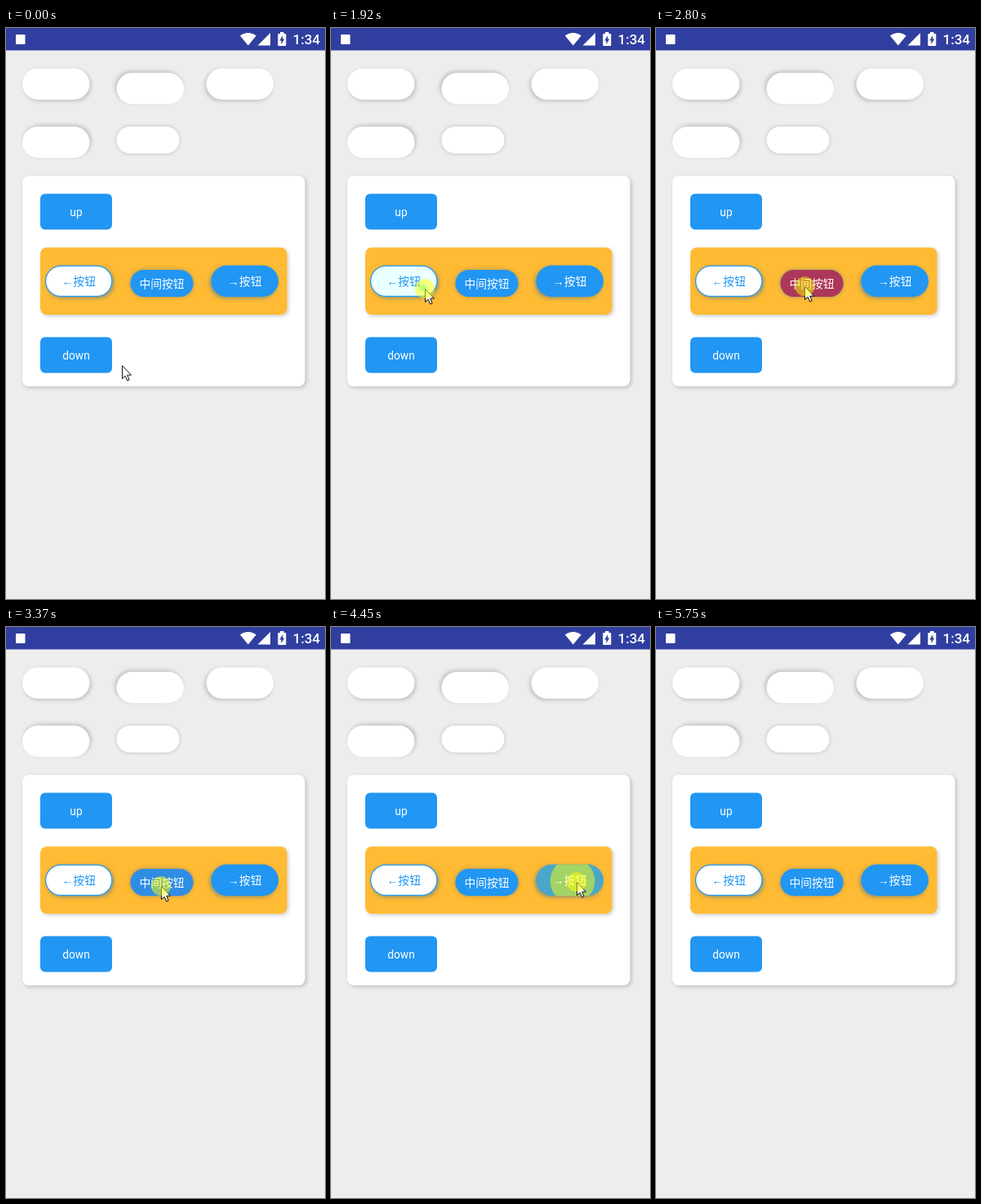
An HTML page with a canvas that plays this animation: 391x701 px, repeating every 6.18 s.

```html
<!DOCTYPE html>
<html lang="zh">
<head>
<meta charset="utf-8">
<title>Shadow buttons</title>
<style>
  html, body { margin: 0; width: 100%; height: 100%; overflow: hidden; background: #ededed; }
  canvas { display: block; }
</style>
</head>
<body>
<canvas id="stage" width="391" height="701"></canvas>
<script>
const ctx = document.getElementById('stage').getContext('2d');
const LOOP = 6180, REFRESH = 50;
const BLUE = '#2196f3', BAR = '#303f9f', PAGE = '#ededed';
const LABEL_FONT = '13.75px Roboto, "Liberation Sans", "Noto Sans CJK SC", "Noto Sans CJK", sans-serif';

// A slot loses INSET on every side where its shadow shows.
const SLOT_W = 88, SLOT_H = 44, INSET = 5.5;

const RIGHT_BOTTOM = [1, 1], LEFT_TOP = [-1, -1], LEFT_BOTTOM = [-1, 1],
  RIGHT_TOP = [1, -1], AROUND = [0, 0];
const PILL_SHADOWS = [RIGHT_BOTTOM, LEFT_TOP, LEFT_BOTTOM, RIGHT_TOP, AROUND];
const BUTTONS = [
  { label: '←按钮', shadow: RIGHT_BOTTOM, fill: '#fff', ink: BLUE, ripple: '#00ffff' },
  { label: '中间按钮', shadow: AROUND, fill: BLUE, ink: '#fff', ripple: '#ff0000' },
  { label: '→按钮', shadow: LEFT_BOTTOM, fill: BLUE, ink: '#fff', ripple: '#ffff00' }
];

// The pointer glides to each stop just before its time.
const stop = (time, x, y) => ({ time, x, y });
const START = stop(0, 142, 414), APPROACH = stop(280, 101, 342), EXIT = stop(5740, 348, 412);
const PRESSES = [
  stop(635, 116, 320), stop(1600, 115, 320),
  stop(2290, 181, 317), stop(3075, 190, 318),
  stop(4043, 301, 313), stop(4665, 301, 313)
];
const STOPS = [START, APPROACH, ...PRESSES, EXIT];
const GLIDE = 360;

// Every button gets a long and a short click; the app reacts after LAG.
const LAG = 200;
const CLICKS = PRESSES.map(({ time, x, y }, i) =>
  ({ down: time, up: time + (i % 2 ? 320 : 520), x, y, target: i >> 1 }));

const clamp = v => Math.max(0, Math.min(1, v));
const mix = (a, b, p) => a + (b - a) * p;

function pointerAt(t) {
  const next = STOPS.findIndex(({ time }) => time > t);
  const a = STOPS[next - 1], b = STOPS[next];
  const begin = Math.max(a.time, b.time - GLIDE);
  const p = clamp((t - begin) / (b.time - begin)), eased = p * p * (3 - 2 * p);
  return [mix(a.x, b.x, eased), mix(a.y, b.y, eased)];
}

function slotBox(x, y, [dx, dy]) {
  const left = dx <= 0 ? INSET : 0, right = dx >= 0 ? INSET : 0;
  const top = dy <= 0 ? INSET : 0, bottom = dy >= 0 ? INSET : 0;
  return [x + left, y + top, SLOT_W - left - right, SLOT_H - top - bottom];
}

function roundBox(x, y, w, h, radius, fill) {
  ctx.beginPath();
  ctx.roundRect(x, y, w, h, radius);
  ctx.fillStyle = fill;
  ctx.fill();
}

function shadowBox([x, y, w, h], radius, fill, [dx, dy], color = 'rgba(0,0,0,0.2)') {
  ctx.save();
  ctx.shadowColor = color;
  ctx.shadowBlur = 5;
  ctx.shadowOffsetX = dx * 1.8;
  ctx.shadowOffsetY = dy * 1.8;
  roundBox(x, y, w, h, radius, fill);
  ctx.restore();
}

function disc(x, y, radius, fill, alpha) {
  ctx.globalAlpha = alpha;
  ctx.fillStyle = fill;
  ctx.beginPath();
  ctx.arc(x, y, radius, 0, 2 * Math.PI);
  ctx.fill();
  ctx.globalAlpha = 1;
}

function text(string, x, y, color, font = LABEL_FONT, align = 'center') {
  ctx.font = font;
  ctx.textAlign = align;
  ctx.fillStyle = color;
  ctx.fillText(string, x, y);
}

function drawStatusBar() {
  ctx.fillStyle = BAR;
  ctx.fillRect(0, 0, 391, 27.5);
  roundBox(12, 8, 11.5, 12, 1, '#fff');

  // Wi-Fi fan and signal triangle
  ctx.beginPath();
  ctx.moveTo(296.8, 21.5);
  ctx.arc(296.8, 21.5, 15.5, -Math.PI * 0.72, -Math.PI * 0.28);
  ctx.fill();
  ctx.fill(new Path2D('M324 6V21.5H308.5Z'));

  // Battery with a point-symmetric bolt
  roundBox(333.3, 7, 10, 15, 1, '#fff');
  ctx.fillRect(336, 5, 4.5, 3);
  ctx.fillStyle = BAR;
  for (const turn of [0, Math.PI]) {
    ctx.save();
    ctx.translate(338.3, 14.5);
    ctx.rotate(turn);
    ctx.fill(new Path2D('M0.9 -5.5L-3 1H0.9Z'));
    ctx.restore();
  }
  text('1:34', 385, 20, '#fff', '500 17px Roboto, sans-serif', 'right');
}

function drawRipple([x, y, w, h], color, index, t) {
  const click = CLICKS.findLast(({ target, down }) => target === index && down + LAG <= t);
  if (!click) return;
  const press = click.down + LAG, release = click.up + LAG;
  const cx = x + w / 2, cy = y + h / 2;

  // The tint rises slowly, completes quickly on release, then fades.
  let tint = clamp((Math.min(t, release) - press) / 600);
  if (t > release) {
    const rush = (1 - tint) * 120, since = t - release;
    tint = since < rush ? mix(tint, 1, since / rush) : clamp(1 - (since - rush) / 480);
  }
  const grow = clamp((t - press - 80) / 211);
  const fade = 1 - clamp((t - release) / 400);

  ctx.save();
  ctx.beginPath();
  ctx.roundRect(x, y, w, h, h / 2);
  ctx.clip();
  disc(cx, cy, w, color, tint / 2);
  disc(mix(click.x, cx, grow), mix(click.y, cy, grow), grow * Math.hypot(w, h) / 2, color, fade / 2);
  ctx.restore();
}

function drawButton({ label, shadow, fill, ink, ripple }, index, t) {
  const box = slotBox(48 + 99 * index, 291.5, shadow);
  const [x, y, w, h] = box;
  shadowBox(box, h / 2, BLUE, shadow, 'rgba(95,130,140,0.7)');
  roundBox(x + 1.2, y + 1.2, w - 2.4, h - 2.4, h / 2 - 1.2, fill);
  drawRipple(box, ripple, index, t);
  text(label, x + w / 2, Math.round(y + h / 2 + 5.6), ink);
}

function drawPointer(t) {
  if (t >= EXIT.time) return;
  const [x, y] = pointerAt(t);
  const arrow = new Path2D('M0 0V16L3.6 12.6L6.2 18.5L8.6 17.5L6.2 11.6H11Z');
  ctx.save();
  ctx.translate(Math.round(x) + 0.5, Math.round(y) + 0.5);
  ctx.fillStyle = '#fff';
  ctx.fill(arrow);
  ctx.strokeStyle = '#111';
  ctx.stroke(arrow);
  ctx.restore();
  if (CLICKS.some(({ down, up }) => down <= t && t < up)) disc(x, y, 12, '#ffff00', 0.5);
}

function drawBlueBox(label, y) {
  roundBox(42, y, SLOT_W, SLOT_H, 6, BLUE);
  text(label, 42 + SLOT_W / 2, Math.round(y + 27), '#fff');
}

function draw(t) {
  ctx.fillStyle = PAGE;
  ctx.fillRect(0, 0, 391, 701);
  drawStatusBar();
  PILL_SHADOWS.forEach((shadow, i) => {
    const box = slotBox(20 + 110 * (i % 3), 49.5 + 66 * Math.floor(i / 3), shadow);
    shadowBox(box, box[3] / 2, '#fff', shadow);
  });
  shadowBox([20, 181.5, 346.5, 258.5], 8, '#fff', RIGHT_BOTTOM);
  drawBlueBox('up', 203.5);
  shadowBox([42, 269.5, 302.5, 82.5], 8, '#ffbb33', RIGHT_BOTTOM);
  BUTTONS.forEach((button, index) => drawButton(button, index, t));
  drawBlueBox('down', 379.5);
  drawPointer(t);
}

function tick() {
  const t = performance.now() % LOOP;
  draw(Math.floor(t / REFRESH) * REFRESH);
  requestAnimationFrame(tick);
}
tick();
</script>
</body>
</html>
```
